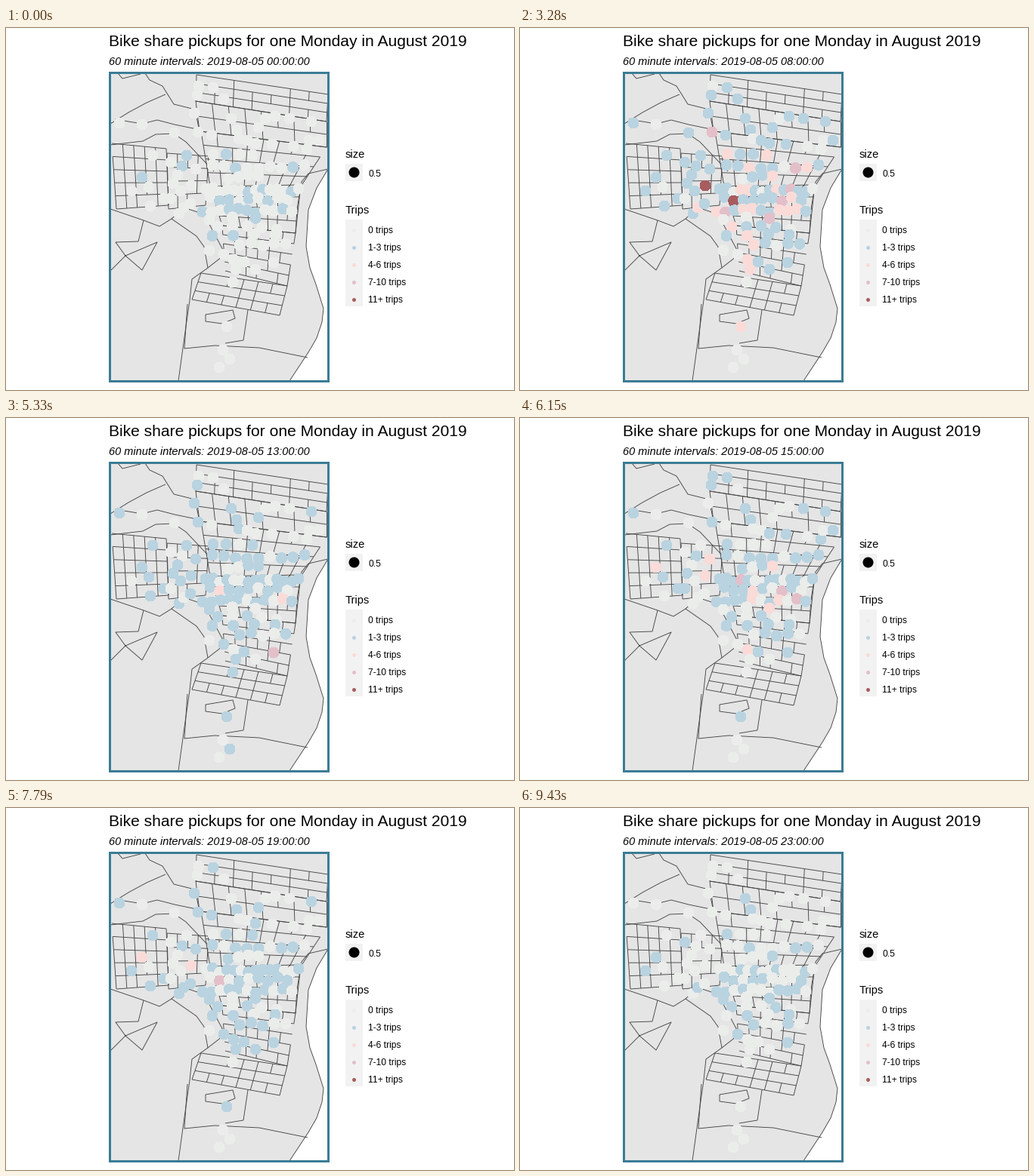
Animation, 672 px wide and 480 px high, one loop 9.84 s. Source, as a matplotlib script:

```python
import numpy as np
import matplotlib.pyplot as plt
from matplotlib.animation import FuncAnimation
from matplotlib.collections import LineCollection
from matplotlib.patches import Polygon, Rectangle

W, H, DPI = 672, 480, 96
HOURS, STEP_MS = 24, 410
PX = 72 / DPI
PALETTE = np.array(["#ebedeb", "#b9d3e0", "#fadbd8", "#e3bfc9", "#a95c5f"])
LABELS = ["0 trips", "1-3 trips", "4-6 trips", "7-10 trips", "11+ trips"]
BINS = [1, 4, 7, 11]
rng = np.random.default_rng(8)

plt.rcParams["font.family"] = "Liberation Sans"
fig = plt.figure(figsize=(W / DPI, H / DPI), dpi=DPI, facecolor="white")
ax = fig.add_axes([0, 0, 1, 1])
ax.set(xlim=(0, W), ylim=(H, 0))
ax.axis("off")


def label(x, y, text, size, **kw):
    return ax.text(x, y, text, fontsize=size * PX, va="baseline", **kw)


def dot(x, y, diameter, color):
    return ax.scatter(x, y, s=(diameter * PX) ** 2, c=color, linewidths=0,
                      antialiased=False, zorder=4)


# ---- Map ----
def grid(tl, tr, br, bl, cols, rows, keep=0.75):
    """Long cross streets, with side streets broken up at random."""
    tl, tr, br, bl = (np.array(p, float) for p in (tl, tr, br, bl))

    def at(u, v):
        return (1 - v) * ((1 - u) * tl + u * tr) + v * ((1 - u) * bl + u * br)

    us, vs = np.linspace(0, 1, cols + 1), np.linspace(0, 1, rows + 1)
    lines = [[at(u, v) for u in us] for v in vs]
    for top, bottom in zip(vs, vs[1:]):
        lines += [[at(u, top), at(u, bottom)] for u in us
                  if rng.random() < keep]
    return lines


shore = [(426, 187), (411, 212), (400, 241), (397, 290), (402, 318),
         (410, 340), (420, 372), (418, 390), (411, 411), (400, 430),
         (375, 468)]
streets = [
    shore,
    [(148, 60), (154, 67), (178, 61)],
    [(184, 60), (190, 69), (207, 77), (222, 101), (250, 108), (256, 137)],
    [(138, 127), (162, 112), (186, 99), (211, 88)],
    [(144, 121), (180, 127), (200, 122), (223, 128), (252, 134)],
    [(138, 155), (181, 150), (198, 141), (222, 140), (238, 151), (275, 190)],
    [(138, 240), (182, 255), (203, 263), (219, 253), (252, 276), (262, 290),
     (267, 318), (246, 333), (243, 361), (236, 410), (228, 468)],
    [(182, 255), (175, 283), (145, 284), (158, 302), (200, 284), (180, 321),
     (158, 302), (138, 322)],
    [(219, 253), (235, 238), (262, 247), (290, 300), (267, 318)],
    [(240, 366), (236, 425), (276, 421), (335, 424), (399, 437)],
    [(264, 380), (300, 374), (303, 385), (286, 392), (264, 389), (264, 380)],
    [(320, 374), (314, 414), (290, 418)],
    [(383, 272), (385, 240), (391, 204), (400, 193), (426, 187)],
]
for district in (
    ((252, 62), (426, 88), (424, 124), (251, 97), 7, 3),
    ((251, 97), (424, 124), (424, 158), (256, 137), 8, 2),
    ((140, 153), (212, 160), (215, 235), (146, 240), 5, 5),
    ((213, 166), (268, 170), (264, 235), (215, 240), 4, 4),
    ((258, 137), (424, 158), (390, 210), (270, 210), 8, 4),
    ((270, 210), (390, 208), (383, 272), (286, 262), 8, 4),
    ((286, 262), (383, 272), (372, 342), (290, 322), 6, 5),
    ((258, 325), (372, 342), (362, 381), (246, 360), 6, 3),
):
    streets += grid(*district)

frame = dict(xy=(137, 58.9), width=289, height=409)
clip = Rectangle(**frame, fc="white", ec="none", zorder=0)
ax.add_patch(clip)
land = [(137, 59), (427, 59), *shore, (137, 468)]
ax.add_patch(Polygon(land, fc="#e5e5e5", ec="none", zorder=1))
roads = LineCollection(streets, colors="#444444", linewidths=0.9 * PX,
                       zorder=2)
ax.add_collection(roads)
roads.set_clip_path(clip)
ax.add_patch(Rectangle(**frame, fill=False, ec="#3b7c95", lw=3 * PX, zorder=5))

# ---- Stations ----
north = [(255, 77), (274, 79), (253, 89), (288, 94), (249, 113), (254, 138),
         (272, 142), (298, 120), (305, 135), (308, 147), (334, 132),
         (343, 120), (356, 117), (375, 120), (404, 124), (319, 149),
         (330, 153), (352, 154), (380, 157), (398, 161), (401, 149),
         (414, 149)]
west = [(150, 126), (180, 128), (223, 139), (194, 169), (239, 169),
        (218, 178), (233, 183), (251, 187), (227, 195), (180, 198),
        (189, 211), (166, 216), (191, 236), (221, 206), (231, 216),
        (245, 209), (209, 226), (218, 226), (229, 246), (235, 238),
        (244, 233)]
south = [(269, 295), (288, 300), (301, 307), (315, 310), (304, 320),
         (330, 320), (354, 311), (300, 337), (292, 396), (287, 427),
         (296, 439), (282, 450)]


def row(y, left, right, count):
    """Stations spread along one downtown street."""
    x = np.linspace(left, right, count)
    return np.column_stack([x, y + rng.uniform(-3, 3, count)])


downtown = [row(*street) for street in (
    (166, 274, 326, 4), (184, 273, 395, 9), (198, 294, 334, 4),
    (215, 264, 387, 14), (227, 270, 372, 9), (242, 260, 378, 11),
    (252, 269, 330, 3), (265, 280, 358, 5), (274, 273, 356, 4),
    (287, 309, 370, 5))]
stations = np.vstack([north, west, south, *downtown])

# ---- Trips: mean per station follows the day, with two commuter peaks ----
hours = np.arange(HOURS)
demand = np.interp(hours, [0, 4, 6, 8, 10, 15, 17, 19, 23],
                   [0.25, 0.04, 0.6, 2.5, 1.0, 1.2, 3.0, 0.9, 0.35])
from_centre = np.hypot(*(stations - (312, 230)).T)
popularity = rng.gamma(2, size=len(stations))
popularity *= np.exp(-(from_centre / 190) ** 2)
popularity /= popularity.mean()
trips = rng.poisson(np.outer(demand, popularity))
levels = np.digitize(trips, BINS)

# ---- Text and legend ----
label(136, 24, "Bike share pickups for one Monday in August 2019", 21)
subtitle = label(136, 49, "", 14.45, style="italic")

label(449, 172, "size", 14.67)
label(479, 197, "0.5", 12)
label(449, 246, "Trips", 14.67)
for top, height in ((180, 23), (253.9, 115)):
    ax.add_patch(Rectangle((449, top), 23, height, fc="#f2f2f2", ec="none"))
dot(459.5, 190.7, 14, "black")
for i, (text, color) in enumerate(zip(LABELS, PALETTE)):
    y = 267.5 + 23 * i
    dot(459.8, y, 5, color)
    label(479, y + 4.5, text, 12)

pickups = dot(*stations.T, 14, PALETTE[levels[0]])


def draw(hour):
    subtitle.set_text(f"60 minute intervals: 2019-08-05 {hour:02d}:00:00")
    pickups.set_facecolor(PALETTE[levels[hour]])
    return subtitle, pickups


anim = FuncAnimation(fig, draw, frames=HOURS, interval=STEP_MS, repeat=True,
                     repeat_delay=0)
plt.show()
```
